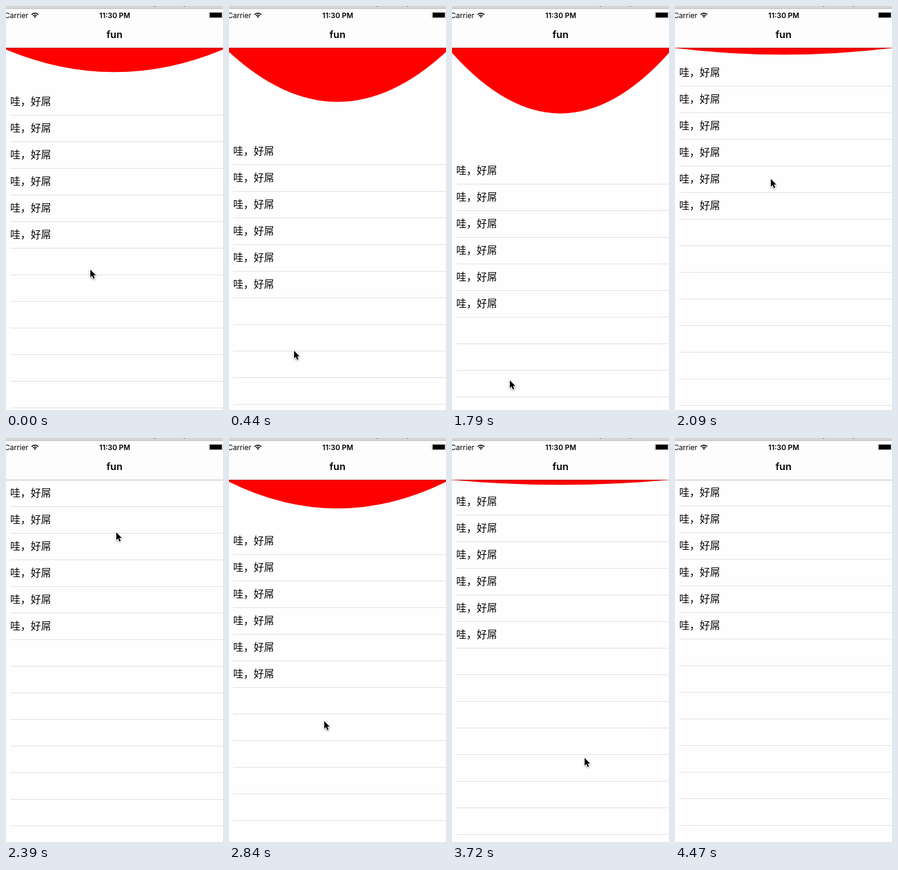
An HTML page with a canvas for the animation above (5.79 s loop, 360x668 px).

```html
<!DOCTYPE html>
<html lang="zh-CN">
<head>
<meta charset="utf-8">
<title>fun</title>
<style>
  html, body { margin: 0; width: 100%; height: 100%; overflow: hidden; background: #fefefe; }
  canvas { display: block; }
</style>
</head>
<body>
<canvas id="stage" width="360" height="668"></canvas>
<script>
const ctx = document.getElementById('stage').getContext('2d');
const LOOP = 5790, BEAT = 149, LEAD = 9;
const W = 360, H = 668, NAV_BOTTOM = 69, ROW = 44;
const ROW_TEXT = '哇\uff0c好屌';

// Times are in beats.
const DRAGS = [
  { start: 0, top: 6, release: 12, from: 68, to: 182 },
  { start: 18, top: 21, release: 22.9, from: 0, to: 153 },
];
const POINTER_PATH = [
  { beat: 0, x: 139, y: 435 },
  { beat: 6, x: 94, y: 621 },
  { beat: 12, x: 95, y: 618 },
  { beat: 16, x: 182, y: 155 },
  { beat: 18, x: 181, y: 187 },
  { beat: 19, x: 157, y: 467 },
  { beat: 21, x: 150, y: 585 },
  { beat: 25, x: 219, y: 528 },
  { beat: 28, x: 281, y: 652 },
  { beat: 30, x: 300, y: 700 },
];

const easeOut = u => 1 - (1 - Math.min(u, 1)) ** 1.83;
const mix = (a, b, u) => a + (b - a) * u;

function pullAt(beat) {
  const { start, top, release, from, to } = DRAGS.findLast(drag => drag.start <= beat);
  const pull = beat < release
    ? mix(from, to, easeOut((beat - start) / (top - start)))
    : to * Math.exp(-((beat - release) ** 1.15));
  return Math.round(pull);
}

function pointerAt(beat) {
  const i = POINTER_PATH.findLastIndex(point => point.beat <= beat);
  const a = POINTER_PATH[i], b = POINTER_PATH[i + 1];
  if (!b) return a;
  const u = easeOut((beat - a.beat) / (b.beat - a.beat));
  return { x: Math.round(mix(a.x, b.x, u)), y: Math.round(mix(a.y, b.y, u)) };
}

function fillRect(color, x, y, w, h) {
  ctx.fillStyle = color;
  ctx.fillRect(x, y, w, h);
}

function label(text, x, y, font, align) {
  ctx.font = font;
  ctx.textAlign = align;
  ctx.fillStyle = '#000';
  ctx.fillText(text, x, y);
}

function drawBulge(pull) {
  if (pull < 2) return;
  const top = NAV_BOTTOM - 0.5;
  ctx.fillStyle = '#f00';
  ctx.beginPath();
  ctx.moveTo(-8, top);
  ctx.quadraticCurveTo(W / 2, top + 1.2 * pull, W + 8, top);
  ctx.fill();
}

function drawRows(pull) {
  for (let i = 0, y = 112 + pull; y < H; i++, y += ROW) {
    fillRect('#e0e0e2', 7, y, W - 7, 1);
    if (i < 6) label(ROW_TEXT, 7, y - 16, '17px "Noto Sans CJK SC", sans-serif', 'left');
  }
}

function wifiArc(radius) {
  ctx.arc(48, 19.6, radius, -Math.PI * 0.75, -Math.PI * 0.25);
}

function drawWifi() {
  ctx.strokeStyle = ctx.fillStyle = '#000';
  ctx.lineWidth = 1.7;
  for (const radius of [4.6, 7.8]) {
    ctx.beginPath();
    wifiArc(radius);
    ctx.stroke();
  }
  ctx.beginPath();
  ctx.moveTo(48, 19.6);
  wifiArc(2.6);
  ctx.fill();
}

function drawBars() {
  fillRect('#fdfdfd', 0, 0, W, NAV_BOTTOM);
  fillRect('#d4d4d4', 0, 0, W, 4);
  fillRect('#c4c4c4', 0, 4, W, 1);
  fillRect('#777', 245, 0, 3, 1);
  fillRect('#777', 295, 0, 2, 1);
  fillRect('rgba(0,0,0,.26)', 0, NAV_BOTTOM, W, 1);
  label('Carrier', 37, 20, '12px Inter, sans-serif', 'right');
  label('11:30 PM', 180.5, 20, '600 12px Inter, sans-serif', 'center');
  label('fun', 180, 53, '600 16.5px Inter, sans-serif', 'center');
  drawWifi();
  fillRect('#d0d0d0', 336, 10, W - 336, 10);
  fillRect('#000', 338, 11, 20, 8);
}

function drawPointer({ x, y }) {
  const arrow = new Path2D('M0 0V14.5L3.3 11.4 5.7 17 8.2 16 5.8 10.5H10.3Z');
  ctx.save();
  ctx.translate(x + 1, y + 1);
  ctx.scale(0.88, 0.88);
  ctx.lineJoin = 'round';
  ctx.lineWidth = 2;
  ctx.strokeStyle = '#fff';
  ctx.shadowColor = 'rgba(0,0,0,.4)';
  ctx.shadowBlur = 3;
  ctx.shadowOffsetY = 1;
  ctx.stroke(arrow);
  ctx.shadowColor = 'transparent';
  ctx.fillStyle = '#000';
  ctx.fill(arrow);
  ctx.restore();
}

function render(now) {
  const beat = Math.floor((now % LOOP + LEAD) / BEAT);
  const pull = pullAt(beat);
  fillRect('#fefefe', 0, 0, W, H);
  drawBulge(pull);
  drawRows(pull);
  drawBars();
  drawPointer(pointerAt(beat));
}

function tick() {
  render(performance.now());
  requestAnimationFrame(tick);
}
tick();
</script>
</body>
</html>
```
